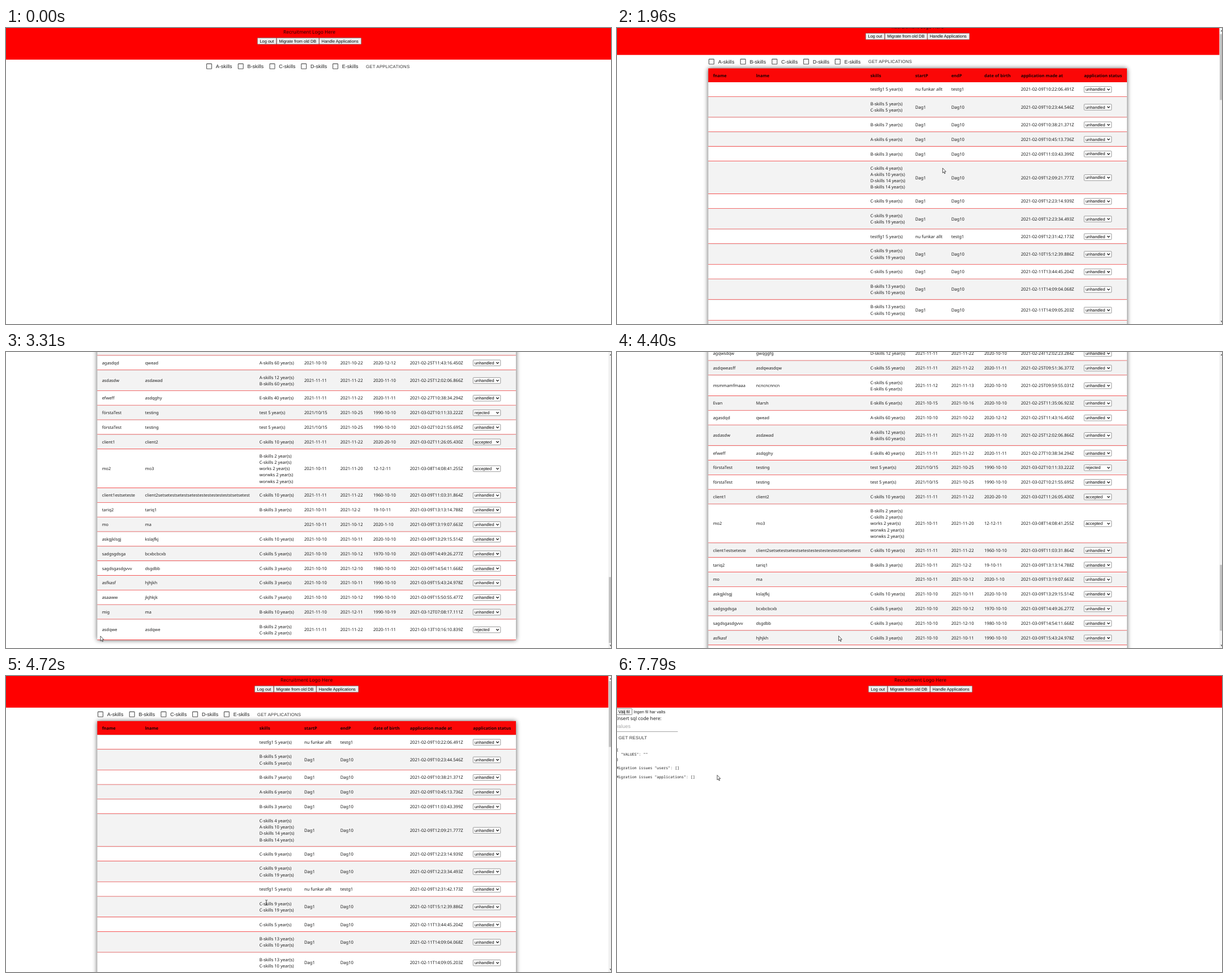
An HTML page that plays this animation: 1069 by 524 pixels, repeating every 8 s.

```html
<!DOCTYPE html>
<html lang="en">
<head>
<meta charset="utf-8">
<title>Recruitment</title>
<style>
html, body { margin: 0; width: 100%; height: 100%; overflow: hidden; background: #fff; }
svg { display: block; width: 1069px; height: 524px; }
text { white-space: pre; text-rendering: geometricPrecision; fill: #1c1c1c; }
.ui { font-family: "Noto Sans", "Open Sans", sans-serif; }
.form { font-family: "Liberation Sans", Arial, sans-serif; }
.mono { font-family: "Noto Sans Mono", "DejaVu Sans Mono", monospace; }
</style>
</head>
<body>
<svg id="stage" viewBox="0 0 1069 524" xmlns="http://www.w3.org/2000/svg">
  <defs>
    <filter id="soft" filterUnits="userSpaceOnUse" x="130" y="50" width="802" height="2260">
      <feGaussianBlur stdDeviation="4"/>
    </filter>
  </defs>
</svg>
<script>
const LOOP = 8000, VIEW_H = 524;
const ROW_H = 25.83, LINE_H = 10.75, BODY_TOP = 104.3;
const COLS = [169.7, 245.8, 447.8, 527, 590.7, 649, 713.7];
const RED = '#ff0000';
const svg = document.getElementById('stage');

function add(parent, tag, attrs = {}, content) {
  const el = document.createElementNS(svg.namespaceURI, tag);
  for (const k in attrs) el.setAttribute(k, attrs[k]);
  if (content !== undefined) el.textContent = content;
  parent.appendChild(el);
  return el;
}
const group = parent => add(parent, 'g');
const rect = (p, x, y, width, height, fill, more) => add(p, 'rect', { x, y, width, height, fill, ...more });
const label = (p, x, y, size, content, cls = 'ui', more) =>
  add(p, 'text', { x, y, 'font-size': size, class: cls, ...more }, content);
const path = (p, d, more) => add(p, 'path', { d, ...more });
const show = (el, on) => el.setAttribute('display', on ? 'inline' : 'none');
const move = (el, x, y) => el.setAttribute('transform', `translate(${x.toFixed(2)} ${y.toFixed(2)})`);

function button(p, x, y, w, textX, content) {
  const box = rect(p, x + .3, y, w - .6, 11.2, '#f0f0f0', { rx: 1, stroke: '#6a6a6a', 'stroke-width': .7 });
  label(p, textX, y + 8.2, 7.42, content, 'form', { style: 'fill:#000' });
  return box;
}

// ---- table data: fname|lname|skills|start|end|birth|made|status
const FIRST = `
||testfg1 5|nu funkar allt|testg1||02-09T10:22:06.491
||B5,C5|Dag1|Dag10||02-09T10:23:44.546
||B7|Dag1|Dag10||02-09T10:38:21.371
||A6|Dag1|Dag10||02-09T10:45:13.736
||B3|Dag1|Dag10||02-09T11:03:43.399
||C4,A10,D14,B14|Dag1|Dag10||02-09T12:09:21.777
||C9|Dag1|Dag10||02-09T12:23:14.939
||C9,C19|Dag1|Dag10||02-09T12:23:34.493
||testfg1 5|nu funkar allt|testg1||02-09T12:31:42.173
||C9,C19|Dag1|Dag10||02-10T15:12:39.886
||C5|Dag1|Dag10||02-11T13:44:45.204
||B13,C10|Dag1|Dag10||02-11T14:09:04.068
||B13,C10|Dag1|Dag10||02-11T14:09:05.203`;
const LAST = `
asdqweasff|asdqwasdqw|C55|2021-11-11|2021-11-22|2020-11-11|02-25T09:51:36.377
msmmamfmaaa|ncncncnncn|C6,E6|2021-11-12|2021-11-13|2020-10-10|02-25T09:59:55.031
Evan|Marsh|E6|2021-10-15|2021-10-16|2020-10-10|02-25T11:35:06.923
agasdqd|qwead|A60|2021-10-10|2021-10-22|2020-12-12|02-25T11:43:16.450
asdasdw|asdawad|A12,B60|2021-11-11|2021-11-22|2020-11-10|02-25T12:02:06.866
efweff|asdqghy|E40|2021-11-11|2021-11-22|2020-11-11|02-27T10:38:34.294
förstaTest|testing|test 5|2021/10/15|2021-10-25|1990-10-10|03-02T10:11:33.222|rejected
förstaTest|testing|test 5|2021/10/15|2021-10-25|1990-10-10|03-02T10:21:55.695
client1|client2|C10|2021-11-11|2021-11-22|2020-20-10|03-02T11:26:05.430|accepted
mo2|mo3|B2,C2,works 2,worwks 2,worwks 2|2021-10-11|2021-11-20|12-12-11|03-08T14:08:41.255|accepted
client1estseteste|client2setsetestsetestsetestestestestesteststsetsetest|C10|2021-11-11|2021-11-22|1960-10-10|03-09T11:03:31.864
tariq2|tariq1|B3|2021-10-11|2021-12-2|19-10-11|03-09T13:13:14.788
mo|ma||2021-10-11|2021-10-12|2020-1-10|03-09T13:19:07.663
askgjklsgj|kslajfkj|C10|2021-10-10|2021-10-11|2020-10-10|03-09T13:29:15.514
sadgsgdsga|bcxbcbcxb|C5|2021-10-10|2021-10-12|1970-10-10|03-09T14:49:26.277
sagdsgasdgvvv|dsgdbb|C3|2021-10-10|2021-12-10|1980-10-10|03-09T14:54:11.668
asfkasf|hjhjkh|C3|2021-10-10|2021-10-11|1990-10-10|03-09T15:43:24.978
asaaww|jkjhkjk|C7|2021-10-10|2021-10-12|1990-10-10|03-09T15:50:55.477
mig|ma|B10|2021-11-10|2021-12-11|1990-10-19|03-12T07:08:17.111
asdqwe|asdqwe|B2,C2|2021-11-11|2021-11-22|2020-11-11|03-13T10:16:10.839|rejected`;

let seed = 11;
const rnd = n => (seed = (seed * 16807) % 2147483647) % n;
const pad = (n, len = 2) => String(n).padStart(len, '0');

// 38 rows between the two ends, 16 of them with two skills
function middleRows() {
  return Array.from({ length: 38 }, (_, i) => {
    const skill = () => 'ABCDE'[rnd(5)] + (2 + rnd(14));
    const word = () => Array.from({ length: 5 + rnd(4) }, () => 'asdqwefg'[rnd(8)]).join('');
    const two = Math.floor((i + 1) * 16 / 38) > Math.floor(i * 16 / 38) && i < 37;
    const skills = two || i === 35 ? skill() + ',' + skill() : skill();
    const made = `02-${12 + Math.floor(i / 3)}T${pad(9 + i % 3 * 3)}:${pad(rnd(60))}:${pad(rnd(60))}.${pad(rnd(1000), 3)}`;
    return i < 19
      ? `||${skills}|Dag1|Dag10||${made}`
      : `${word()}|${word()}|${skills}|2021-11-11|2021-11-22|2020-10-10|${made}`;
  });
}
const rows = [...FIRST.trim().split('\n'), ...middleRows(), ...LAST.trim().split('\n')].map(r => r.split('|'));
const skillText = s => s.replace(/^([A-E])(\d+)$/, '$1-skills $2') + ' year(s)';

// ---- page
const page = group(svg);
const home = group(page);
const tableLayer = group(home);
const filters = group(home);
const migrate = group(page);
const header = group(page);

rect(header, -10, 0, 1100, 56, RED);
label(header, 536, 9.7, 8.45, 'Recruitment Logo Here', 'ui', { 'text-anchor': 'middle', style: 'fill:#200' });
button(header, 444, 17.6, 34, 448.5, 'Log out');
const migrateBtn = button(header, 478, 17.6, 75.3, 482.4, 'Migrate from old DB');
button(header, 553.3, 17.6, 74.7, 557.6, 'Handle Applications');

[...'ABCDE'].forEach((c, i) => {
  const x = 354 + i * 55.75;
  rect(filters, x + .55, 63.4, 8.9, 8.9, 'none', { rx: .6, stroke: '#555', 'stroke-width': 1.1 });
  label(filters, x + 16.8, 70.9, 8.9, c + '-skills', 'form', { 'letter-spacing': .08 });
});
label(filters, 636, 70.7, 7.8, 'GET APPLICATIONS', 'form', { 'letter-spacing': .22, style: 'fill:#333' });

const shadow = rect(tableLayer, 161.3, 80, 739.7, 10, '#000', { opacity: .65, filter: 'url(#soft)' });
rect(tableLayer, 161.3, 79.8, 739.7, BODY_TOP - 79.8, '#fb0707');
['fname', 'lname', 'skills', 'startP', 'endP', 'date of birth', 'application made at', 'application status']
  .forEach((h, i) => label(tableLayer, COLS[i] || 825.2, 95.2, 7.45, h, 'ui', { 'font-weight': 700, style: 'fill:#1c0000' }));

const centers = [];
let y = BODY_TOP;
rows.forEach((row, i) => {
  const skills = row[2] ? row[2].split(',') : [];
  const h = ROW_H + Math.max(0, skills.length - 1) * LINE_H, mid = y + h / 2;
  centers.push(mid);
  rect(tableLayer, 161.3, y, 739.7, h, i % 2 ? '#f3f3f3' : '#fff');
  rect(tableLayer, 161.3, y + h - .8, 739.7, .8, '#f52020');
  COLS.forEach((x, c) => {
    if (c === 2) {
      skills.forEach((s, k) =>
        label(tableLayer, x, mid + 2.6 + (k - (skills.length - 1) / 2) * 11.2, 7.6, skillText(s)));
    } else if (row[c]) {
      label(tableLayer, x, mid + 2.6, c < 2 ? 7.4 : 7.65, c === 6 ? `2021-${row[c]}Z` : row[c]);
    }
  });
  rect(tableLayer, 825.4, mid - 5.2, 48.4, 10.4, '#fff', { rx: 1, stroke: '#707070', 'stroke-width': .7 });
  label(tableLayer, 828, mid + 2.5, 7.42, row[7] || 'unhandled', 'form', { style: 'fill:#000' });
  path(tableLayer, `M866.2 ${mid - 1.2}l2.3 2.3l2.3 -2.3`, { fill: 'none', stroke: '#111', 'stroke-width': 1.2 });
  y += h;
});
shadow.setAttribute('height', y - 80);
const docH = y + 14, maxScroll = docH - VIEW_H;

button(migrate, -6, 57.3, 33, 2.4, 'Välj fil');
label(migrate, 29.4, 65.6, 7.42, 'Ingen fil har valts', 'form');
label(migrate, -1.6, 78.4, 8.4, 'Insert sql code here:');
label(migrate, -2.2, 92.4, 8.9, 'values', 'form', { style: 'fill:#a4a4a4', 'letter-spacing': .08 });
rect(migrate, 0, 98, 107.5, .7, '#808080');
label(migrate, 2.8, 111.6, 7.8, 'GET RESULT', 'form', { 'letter-spacing': .22, style: 'fill:#333' });
[['{', 133.2], ['  "VALUES": ""', 141.4], ['}', 149.7],
 ['Migration issues "users": []', 165.4], ['Migration issues "applications": []', 181.2]]
  .forEach(([s, by]) => label(migrate, -1.2, by, 6.64, s, 'mono'));

// ---- scrollbar
const bar = group(svg);
const TRACK_TOP = 9, TRACK_H = 506, thumbH = TRACK_H * VIEW_H / docH;
rect(bar, 1064.3, 0, 5, VIEW_H, '#f1f1f1');
const thumb = rect(bar, 1065.2, 0, 4, thumbH, '#c1c1c1');
path(bar, 'M1066.4 6L1069 3.4V6ZM1066.4 518.6L1069 521.2V518.6Z', { fill: '#505050' });

// ---- pointer
const glow = add(svg, 'circle', { r: 4.6, fill: '#ffe65a', opacity: .8 });
const cursor = group(svg);
const line = { fill: '#fff', stroke: '#111', 'stroke-width': .7, 'stroke-linejoin': 'round' };
const shapes = {
  arrow: path(cursor, 'M.4 .4V9L2.3 7.2L3.7 10.3L5 9.7L3.6 6.7H6.3Z', line),
  hand: path(cursor, 'M-1 5.5V.8Q0 -.5 1 .8V4L4.6 4.8Q5.4 5 5.2 6L4.5 10H0L-3 6.4Q-2.4 5.4 -1 6.6Z', line),
  beam: path(cursor, 'M-2 -4.4Q0 -4.4 0 -3.4Q0 -4.4 2 -4.4M0 -3.4V3.8M-2 4.8Q0 4.8 0 3.8Q0 4.8 2 4.8',
    { fill: 'none', stroke: '#222', 'stroke-width': .8 })
};

// ---- timeline
const POINTER = [
  [70, 945, 457], [700, 641, 66], [1010, 641, 66], [1580, 575, 247.5], [1960, 575, 247.5],
  [2220, 570.5, 253], [2760, 209, 512], [3080, 169, 508], [3310, 166.5, 502.5], [3550, 166.5, 502.5],
  [3850, 266, 506], [4010, 266, 506], [4400, 391, 502.5], [4720, 460, 401.5], [4880, 476, 328],
  [5670, 511, 23.5], [6380, 511, 23.5], [6860, 3, 513], [7010, 3, 513], [7320, 330.5, 246.5],
  [7600, 330.5, 246.5], [7790, 176.6, 175]
];
const anchor = centers[rows.length - 18];
const low = anchor - 22, high = anchor - 85.3;
const SCROLL = [[1930, 0], [1960, 1.7], [2220, low], [2300, maxScroll], [4320, maxScroll], [4400, high], [4700, 0]];

function at(keys, t, i) {
  const n = keys.findIndex(k => k[0] > t);
  if (n === 0) return keys[0][i];
  if (n < 0) return keys[keys.length - 1][i];
  const a = keys[n - 1], b = keys[n];
  return a[i] + (b[i] - a[i]) * (t - a[0]) / (b[0] - a[0]);
}
const within = (t, a, b) => t >= a && t < b;

function draw(t) {
  const table = within(t, 1010, 6380), onMigrate = t >= 6380;
  const scroll = table ? at(SCROLL, t, 1) : 0;
  move(page, 0, -scroll);
  move(header, table ? -4.9 : 0, 0);
  move(filters, table ? -192.1 : 0, 0);
  show(home, !onMigrate);
  show(tableLayer, table);
  show(migrate, onMigrate);
  show(bar, table);
  thumb.setAttribute('y', TRACK_TOP + scroll / maxScroll * (TRACK_H - thumbH));
  migrateBtn.setAttribute('fill', within(t, 5600, 6220) ? '#e3e3e3' : '#f0f0f0');

  const x = at(POINTER, t, 1), py = at(POINTER, t, 2);
  const kind = within(t, 640, 1010) ? 'hand' : within(t, 4640, 4960) ? 'beam' : 'arrow';
  for (const k in shapes) show(shapes[k], k === kind);
  show(cursor, t >= 70);
  move(cursor, x, py);
  show(glow, within(t, 850, 1010) || within(t, 6220, 6380));
  move(glow, x, py + 1);
}

function tick() {
  draw(performance.now() % LOOP);
  requestAnimationFrame(tick);
}
tick();
</script>
</body>
</html>
```
